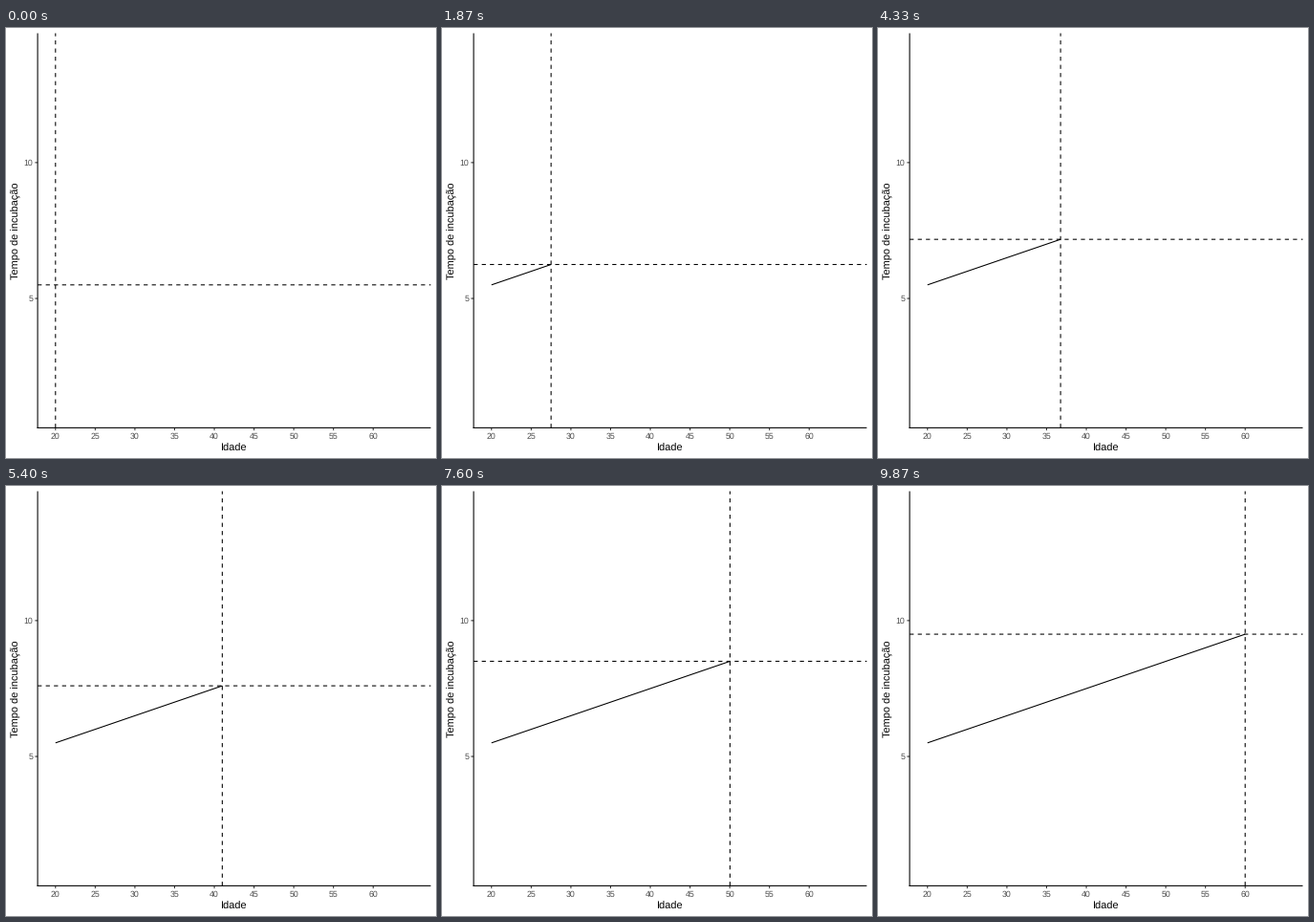
A matplotlib script that plays this animation: 450 by 450 pixels, repeating every 10000 ms.

```python
import matplotlib.pyplot as plt
from matplotlib.animation import FuncAnimation

plt.rcParams.update({
    "font.family": "Liberation Sans",
    "text.hinting": "none",
    "path.snap": False,
})

SIZE, DPI = 450, 72
FRAMES, LOOP_MS = 150, 10000
LEFT, RIGHT, TOP, BOTTOM = 33.1, 444.5, 5.5, 418.4
X_RANGE = (17.75, 67.25)
Y_RANGE = (0.24, 14.76)
LINE = 1.067
AGES = range(20, 61, 5)
KEYS = [round(i * (FRAMES - 1) / (len(AGES) - 1)) for i in range(len(AGES))]

fig = plt.figure(figsize=(SIZE / DPI, SIZE / DPI), dpi=DPI, facecolor="white")
ax = fig.add_axes([0, 0, 1, 1])
ax.set(xlim=(0, SIZE), ylim=(SIZE, 0))
ax.axis("off")


def px(age):
    return LEFT + (age - X_RANGE[0]) / (X_RANGE[1] - X_RANGE[0]) * (RIGHT - LEFT)


def py(days):
    return BOTTOM - (days - Y_RANGE[0]) / (Y_RANGE[1] - Y_RANGE[0]) * (BOTTOM - TOP)


def incubation(age):
    return 5.5 + (age - 20) / 10


def stroke(xs, ys, color="black", **kw):
    line, = ax.plot(xs, ys, color=color, lw=LINE, solid_capstyle="butt",
                    dash_capstyle="butt", **kw)
    return line


def label(x, y, text, size=8.8, color="#4d4d4d", ha="center", **kw):
    ax.text(x, y, text, size=size, color=color, ha=ha, va="baseline", **kw)


def draw_axes():
    stroke([LEFT, LEFT], [TOP, BOTTOM + LINE / 2], zorder=4)
    stroke([LEFT - LINE / 2, RIGHT], [BOTTOM, BOTTOM], zorder=4)
    for age in AGES:
        stroke([px(age)] * 2, [BOTTOM, BOTTOM + 2.75], "#333333")
        label(px(age), 429.9, str(age))
    for days in (5, 10):
        stroke([LEFT - 2.75, LEFT], [py(days)] * 2, "#333333")
        label(LEFT - 4.95, py(days) + 3.2, str(days), ha="right")
    label((LEFT + RIGHT) / 2, 442.9, "Idade", 11, "black")
    label(13.4, (TOP + BOTTOM) / 2, "Tempo de incubação", 11, "black",
          ha="right", rotation=90, rotation_mode="anchor") if False else \
        label(13.4, (TOP + BOTTOM) / 2, "Tempo de incubação", 11, "black",
              rotation=90, rotation_mode="anchor")


def ease(t):
    return 4 * t ** 3 if t < 0.5 else 1 - 4 * (1 - t) ** 3


def age_at(frame):
    seg = max(i for i in range(len(KEYS) - 1) if KEYS[i] <= frame)
    start, end = KEYS[seg], KEYS[seg + 1]
    return AGES[seg] + 5 * ease((frame - start) / (end - start))


draw_axes()
trend = stroke([], [])
vline = stroke([], [], dashes=(4, 4))
hline = stroke([], [], dashes=(4, 4))


def update(frame):
    age = age_at(frame)
    x, y = px(age), py(incubation(age))
    trend.set_data([px(20), x], [py(incubation(20)), y])
    vline.set_data([x, x], [BOTTOM, TOP])
    hline.set_data([LEFT, RIGHT], [y, y])
    return trend, vline, hline


anim = FuncAnimation(fig, update, frames=FRAMES, interval=LOOP_MS / FRAMES,
                     repeat=True, repeat_delay=0)
plt.show()
```
